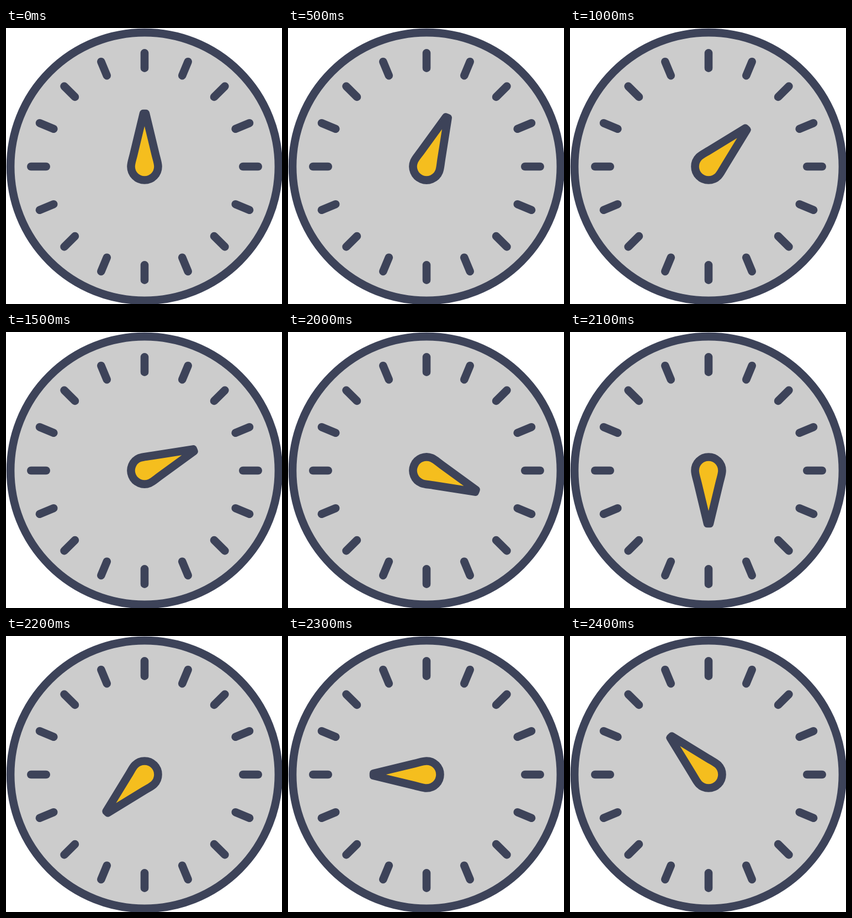
Write an HTML page that moves like this. It is 500 by 500 pixels and loops after 2.5 s.

```html
<!DOCTYPE html>
<html>
<head>
<meta charset="utf-8">
<style>
  html, body { margin: 0; width: 100%; height: 100%; overflow: hidden; background: #fff; }
  svg { display: block; width: 100vw; height: 100vh; }
</style>
</head>
<body>
<svg viewBox="0 0 500 500">
  <g transform="translate(251 251)" stroke="#3d4359" stroke-width="14.6" stroke-linecap="round" stroke-linejoin="round">
    <circle r="242.9" fill="#ccc"/>
    <g id="ticks"></g>
    <path id="needle" fill="#f5be1e" d="M-2-96H2L19.8-22C22.5-11 24.5-6 24.5 0A24.5 24.5 0 0 1-24.5 0C-24.5-6-22.5-11-19.8-22Z"/>
  </g>
</svg>
<script>
  const LOOP = 2500, SPIN = 2000, STEP = 22.5;
  const ticks = document.getElementById('ticks');
  const needle = document.getElementById('needle');

  for (let a = 0; a < 360; a += STEP)
    ticks.innerHTML += `<path d="M0-178.3V-205.7" transform="rotate(${a})"/>`;

  // One tick every half second, then a fast spin back to the top.
  function tickAt(t) {
    return t < SPIN
      ? Math.floor(t / 500)
      : 5 + Math.ceil(2.25 * Math.floor((t - SPIN) / 100));
  }

  const begin = performance.now();
  function draw() {
    const t = (performance.now() - begin) % LOOP;
    needle.setAttribute('transform', `rotate(${tickAt(t) * STEP})`);
    requestAnimationFrame(draw);
  }
  draw();
</script>
</body>
</html>
```
